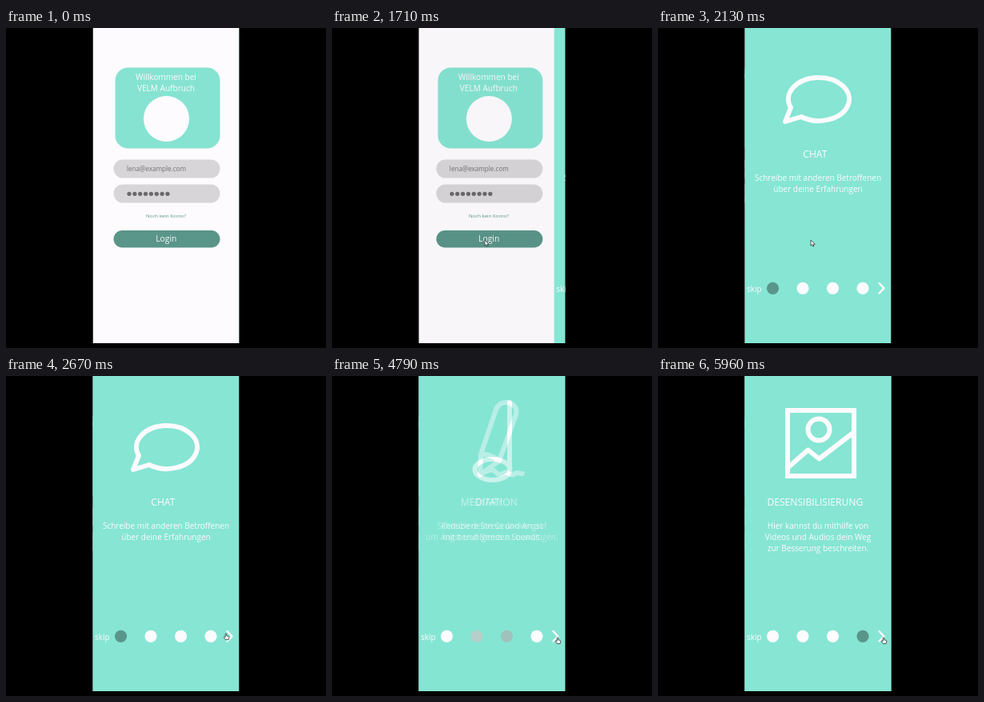
These frames come from a looping animation (400 px wide and 400 px high, 6 s). An HTML page:

```html
<!DOCTYPE html>
<html lang="de">
<head>
<meta charset="utf-8">
<style>
  html, body { margin: 0; width: 100%; height: 100%; overflow: hidden; background: #000; }
  svg { display: block; width: 100vw; height: 100vh; }
  text { font-family: "Open Sans", "Noto Sans", sans-serif; font-size: 10px; fill: #fdfbfe; }
  .mid { text-anchor: middle; }
  .title { font-size: 12.1px; }
  .icon { fill: none; stroke: #fdfbfe; stroke-width: 6; stroke-linejoin: round; stroke-linecap: round; }
  .cursor path { fill: #fff; stroke: #333; stroke-width: .8; stroke-linejoin: round; }
</style>
</head>
<body>
<svg viewBox="0 0 400 400">
  <clipPath id="phone"><rect x="108.5" width="183" height="394"/></clipPath>
  <g clip-path="url(#phone)">
    <g id="login">
      <rect x="108.5" width="183" height="394" fill="#fdfbfe"/>
      <rect x="136.5" y="49.5" width="131" height="101" rx="16" fill="#86e3d1"/>
      <text class="mid" x="200" y="65" style="font-size:10.1px">Willkommen bei</text>
      <text class="mid" x="200" y="78.7" style="font-size:10.1px">VELM Aufbruch</text>
      <circle cx="200.5" cy="113.5" r="28.5" fill="#fdfbfe"/>
      <g fill="#d8d5d9">
        <rect x="134.5" y="164.5" width="133" height="23" rx="11.5"/>
        <rect x="134.5" y="195.5" width="133" height="23" rx="11.5"/>
      </g>
      <text x="151" y="179.3" style="font-size:8.1px;fill:#727074">lena@example.com</text>
      <g id="secret" fill="#6c696e"></g>
      <text class="mid" x="200" y="237" style="font-size:6.15px;fill:#5a9589">Noch kein Konto?</text>
      <rect x="134.5" y="253" width="133" height="21.5" rx="10.75" fill="#5a9589"/>
      <text class="mid" x="200.3" y="267.3" style="font-size:10.3px">Login</text>
    </g>
    <rect id="shade" x="108.5" width="183" height="394"/>
    <g id="tour"></g>
  </g>
  <g id="cursor" class="cursor">
    <path id="arrow" d="M0 0V7.2L1.7 5.7L2.8 8.2L4 7.7L2.9 5.3H5.2Z"/>
    <path id="hand" d="M-.8 .3Q0-.6 .7.3V2.8L3.2 3.4Q4 3.7 3.9 4.7L3.2 7.6H-.6L-2.8 4.6Q-2.6 3.4-.8 4.4Z"/>
  </g>
</svg>
<script>
const $ = id => document.getElementById(id);

const pages = [
  {
    title: "CHAT",
    lines: ["Schreibe mit anderen Betroffenen", "über deine Erfahrungen"],
    icon: '<path d="M166 99.5A38 27 0 1 1 179 111L159 117Z"/>'
  },
  {
    title: "DIARY",
    lines: ["Schreibe deine Gedanken auf", "um Angst und Stress zu bewältigen."],
    icon: '<path d="M185 123.5L186 98L205 42C210 27 234 32 230 48L209 106ZM186 98Q198 97 209 106' +
          'M186 123C196 117 201 115 206 121S214 118 219 121S226 125 230 121L238 122"/>'
  },
  {
    title: "MEDITATION",
    lines: ["Reduziere Stress und Angst", "mit beruhigenden Sounds."],
    icon: '<ellipse cx="200.5" cy="117" rx="22" ry="13"/><path d="M222 117V33"/>'
  },
  {
    title: "DESENSIBILISIERUNG",
    lines: ["Hier kannst du mithilfe von", "Videos und Audios dein Weg", "zur Besserung beschreiten."],
    icon: '<path stroke-linejoin="miter" style="stroke-linejoin:miter" d="M162 43H245V125H162Z"/>' +
          '<circle cx="201" cy="67" r="13.5"/><path d="M163 114L187.500 92.500L201.500 103.500L244 71"/>'
  }
];

const pageMarkup = ({ title, lines, icon }, active) => `<g>
  <rect x="108.5" width="183" height="394" fill="#86e5d3"/>
  <g class="icon">${icon}</g>
  <text class="mid title" x="196.3" y="161.5">${title}</text>
  ${lines.map((line, i) => `<text class="mid" x="200" y="${191.3 + 14 * i}">${line}</text>`).join("")}
  <text x="111" y="330">skip</text>
  ${pages.map((_, i) => `<circle cx="${143.5 + 37.5 * i}" cy="325.3" r="7.6"
    fill="${i === active ? "#5a9589" : "#fdfbfe"}"/>`).join("")}
  <path class="icon" style="stroke-width:2.4" d="M276.500 319L282.500 325.300L276.500 331.500"/>
</g>`;

$("tour").innerHTML = pages.map(pageMarkup).join("");
$("secret").innerHTML = Array.from({ length: 8 }, (_, i) =>
  `<circle cx="${154 + 6.85 * i}" cy="207.3" r="2.6"/>`).join("");
const screens = [...$("tour").children];

const clamp = x => Math.min(1, Math.max(0, x));
const ease = x => x < .5 ? 4 * x ** 3 : 1 - 4 * (1 - x) ** 3;
const progress = (t, start) => ease(clamp((t - start) / 500));

const slideStart = 1578;
const fadeStarts = [3602, 4530, 5245];

// Cursor stops: time, x, y
const stops = [[420, 387, 62], [1000, 191, 265], [2230, 191, 265], [2670, 275, 322], [2880, 275, 322], [3040, 282, 327]];

function cursorAt(t) {
  const i = stops.findIndex(stop => stop[0] > t);
  if (i < 0) return stops.at(-1).slice(1);
  const [a, b] = [stops[Math.max(0, i - 1)], stops[i]];
  const k = clamp((t - a[0]) / (b[0] - a[0] || 1));
  const s = k * k * (3 - 2 * k);
  return [a[1] + (b[1] - a[1]) * s, a[2] + (b[2] - a[2]) * s];
}

function draw() {
  const t = performance.now() % 6000;

  const slide = progress(t, slideStart);
  $("login").setAttribute("transform", `translate(${-54.9 * slide})`);
  $("shade").setAttribute("opacity", .25 * slide);
  $("tour").setAttribute("transform", `translate(${183 * (1 - slide)})`);
  fadeStarts.forEach((start, i) => screens[i + 1].setAttribute("opacity", progress(t, start)));

  const [x, y] = cursorAt(t);
  const pointing = x > 270 && t > 2230;
  $("cursor").setAttribute("transform", `translate(${x} ${y})`);
  $("cursor").setAttribute("visibility", t < 420 ? "hidden" : "visible");
  $("arrow").setAttribute("opacity", pointing ? 0 : 1);
  $("hand").setAttribute("opacity", pointing ? 1 : 0);
  requestAnimationFrame(draw);
}
draw();
</script>
</body>
</html>
```
